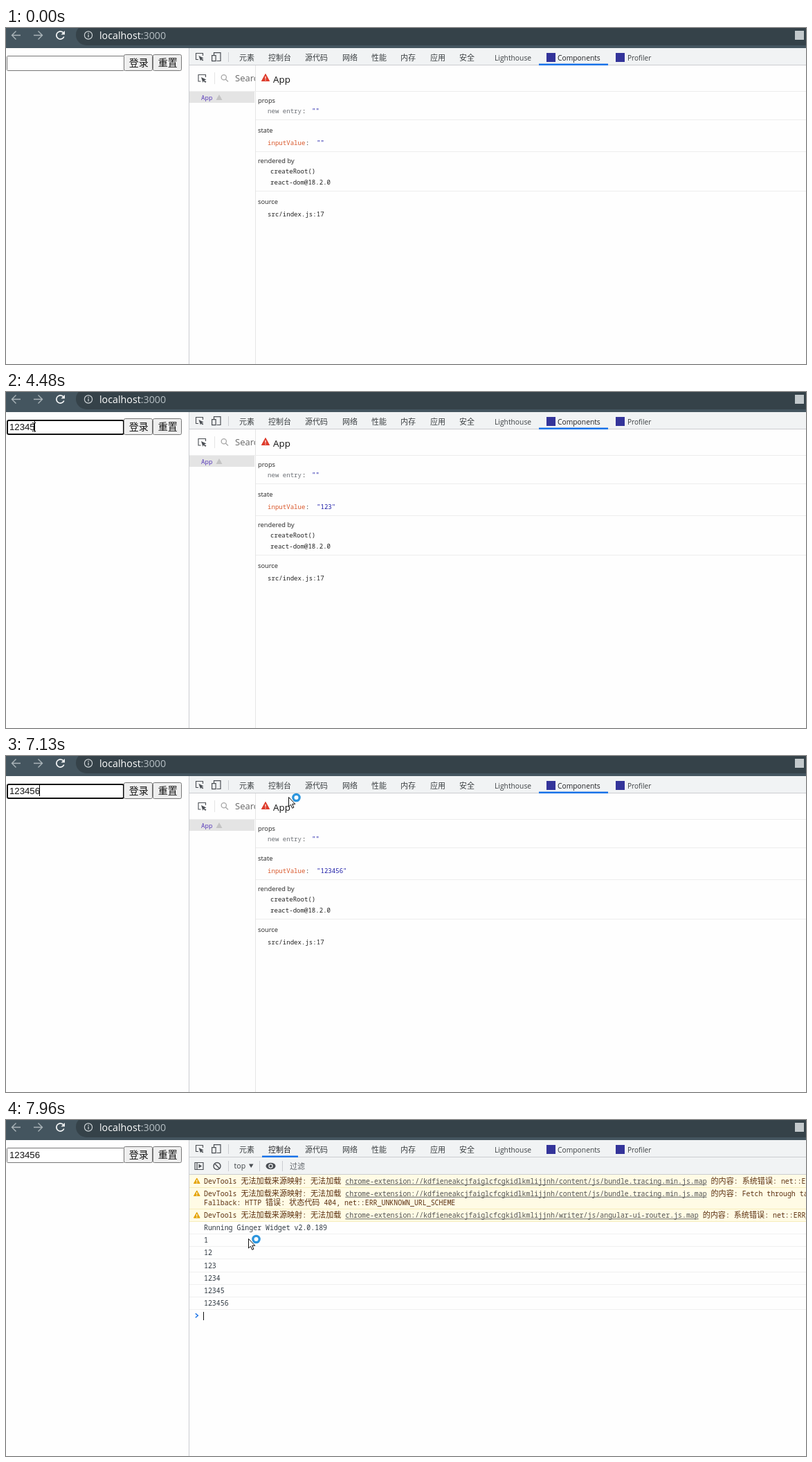
These frames come from a looping animation (1156x485 px, 8000 ms). An HTML page with a canvas:

```html
<!DOCTYPE html>
<html lang="zh-CN">
<head>
<meta charset="utf-8">
<title>localhost:3000</title>
<style>
html, body { margin: 0; width: 100%; height: 100%; overflow: hidden; background: #fefefe; }
canvas { display: block; }
</style>
</head>
<body>
<canvas id="stage" width="1156" height="485"></canvas>
<script>
const W = 1156, H = 485, LOOP = 8000;
const ctx = document.getElementById('stage').getContext('2d');
const CJK = '"Noto Sans CJK SC", "Noto Sans CJK", "Noto Sans CJK JP", sans-serif';
const UI = '"Open Sans", "Noto Sans", sans-serif';
const MONO = '"Noto Sans Mono", "DejaVu Sans Mono", monospace';
const ARIAL = '"Liberation Sans", Arial, sans-serif';
const BLUE = '#1a73e8', ICON = '#4a4e53', BAR = '#f1f3f4', RULE = '#cbcdd1', INK = '#222';

const KEYS = [1610, 2610, 3350, 4080, 4480, 4950];       // a digit enters the field
const POLLS = [[1680, 1], [2680, 2], [3680, 3], [4680, 5], [5680, 6]]; // inspector refresh
const CARETS = [880, 1680, ...KEYS.slice(1)];            // blink restarts
const FOCUS = 880, BLUR = 7400, SWITCH = 7540, BLINK = 530;

// Pointer path: time, x, y
const PATH = [
  [70, 907, 456], [200, 760, 360], [400, 330, 150], [550, 120, 75], [700, 48, 52], [750, 40, 50],
  [5409, 40, 50], [5410, 31, 50], [5479, 31, 50], [5480, 23, 50], [5680, 23, 50],
  [5890, 170, 95], [6170, 520, 215], [6240, 575, 226], [6310, 587, 227], [6450, 541, 209],
  [6646, 463, 210], [6870, 440, 165], [7100, 410, 65], [7267, 398, 31],
  [7500, 398, 31], [7540, 395, 27], [7680, 380, 80], [7958, 350, 171]
];

function box(x, y, w, h, color) {
  ctx.fillStyle = color;
  ctx.fillRect(x, y, w, h);
}

function text(s, x, y, size, family, color) {
  ctx.font = size + 'px ' + family;
  ctx.fillStyle = color;
  ctx.fillText(s, x, y);
  return x + ctx.measureText(s).width;
}

const mono = (s, x, y, color = INK) => text(s, x, y, 9.07, MONO, color);
const label = (s, x, y, color = INK) => text(s, x, y, 9.3, UI, color);
const cjk = (s, x, y, color = '#3c4043') => text(s, x, y, 11, CJK, color);

// Console line: Latin in mono, Chinese in the CJK face
function line(s, x, y, color = '#303942') {
  for (const run of s.match(/[\u4e00-\u9fff]+|[^\u4e00-\u9fff]+/g)) {
    const han = run > '\u4e00';
    x = text(run, x, y, han ? 11.1 : 9.905, han ? CJK : MONO, color);
  }
  return x;
}

function stroke(color, width, draw) {
  ctx.strokeStyle = color;
  ctx.lineWidth = width;
  ctx.beginPath();
  draw();
  ctx.stroke();
}

function poly(pts, close) {
  pts.forEach(([x, y], i) => i ? ctx.lineTo(x, y) : ctx.moveTo(x, y));
  if (close) ctx.closePath();
}

function fillPoly(pts, color) {
  ctx.fillStyle = color;
  ctx.beginPath();
  poly(pts, true);
  ctx.fill();
}

function dot(x, y, r, color) {
  ctx.fillStyle = color;
  ctx.beginPath();
  ctx.arc(x, y, r, 0, 7);
  ctx.fill();
}

function round(x, y, w, h, r, fill, edge, width) {
  ctx.beginPath();
  ctx.roundRect(x, y, w, h, r);
  if (fill) { ctx.fillStyle = fill; ctx.fill(); }
  if (edge) { ctx.strokeStyle = edge; ctx.lineWidth = width; ctx.stroke(); }
}

function warning(x, y, w, h, color) {
  fillPoly([[x, y + h], [x + w / 2, y], [x + w, y + h]], color);
  ctx.lineJoin = 'round';
  stroke(color, 1, () => poly([[x + .5, y + h - .5], [x + w / 2, y + .5], [x + w - .5, y + h - .5]], true));
  ctx.lineJoin = 'miter';
  box(x + w / 2 - .6, y + h * .34, 1.2, h * .34, '#fff');
  box(x + w / 2 - .6, y + h * .78, 1.2, 1.2, '#fff');
}

function inspectIcon(x, y, s) {
  stroke(ICON, 1.1, () => poly([[x + s, y + 4], [x + s, y + .5], [x + .5, y + .5], [x + .5, y + s - 1], [x + 4, y + s - 1]]));
  fillPoly([[x + 4.5, y + 4], [x + s + 1, y + 7.6], [x + 8.8, y + 8.6], [x + s + 1, y + s - .5],
            [x + s - .5, y + s + 1], [x + 8, y + 9.6], [x + 7, y + s + 1]], ICON);
}

function browserBar() {
  box(0, 0, W, 29, '#44555f');
  round(101, -5, 1100, 30, 15, '#354249');
  for (const [x, d] of [[8, 1], [53, -1]]) {
    stroke('#aab4b9', 1.4, () => {
      poly([[x + 13 * d, 10.5], [x + d, 10.5]]);
      poly([[x + 6.5 * d, 4.5], [x + .5 * d, 10.5], [x + 6.5 * d, 16.5]]);
    });
  }
  stroke('#f3f5f6', 1.7, () => ctx.arc(78.5, 10.5, 5.6, .35, 5.5));
  fillPoly([[85, 4], [85, 9.5], [79.5, 9.5]], '#f3f5f6');
  stroke('#cdd3d6', 1.2, () => ctx.arc(119, 10.5, 5.6, 0, 7));
  box(118.4, 9.5, 1.3, 4, '#cdd3d6');
  box(118.4, 7, 1.3, 1.4, '#cdd3d6');
  const x = text('localhost', 135, 16, 14.25, UI, '#fff');
  text(':3000', x, 16, 14.25, UI, '#b6bfc4');
  box(1140, 4, 13, 13, '#c3c9cc');
}

function page(t, p) {
  box(0, 29, 264, H - 29, '#fefefe');
  const focused = t >= FOCUS && t < BLUR;
  if (focused) round(2, 41, 168, 20, 2, '#fff', '#101010', 2);
  else round(1.5, 40.5, 169, 21, 1, '#fff', p && inField(p) ? '#4f4f4f' : '#767676', 1);
  const n = KEYS.filter(k => t >= k).length;
  text('123456'.slice(0, n), 5, 54.5, 13.2, ARIAL, '#111');
  if (focused) {
    const last = CARETS.filter(k => t >= k).pop();
    if (Math.floor((t - last) / BLINK) % 2 === 0 && !(t >= 1610 && t < 1680))
      box(Math.floor(5 + 7.24 * n), 42, 1, 16, '#000');
  }
  [['登录', 170.5], ['重置', 212.5]].forEach(([s, x]) => {
    round(x, 38.5, 41, 23, 2, '#efefef', '#767676', 1);
    text(s, x + 7.2, 55, 14, CJK, '#111');
  });
}

function tabs(onConsole, p) {
  box(264, 29, W - 264, 25, BAR);
  box(264, 53, W - 264, 1, RULE);
  if (!onConsole && p && p.y >= 30 && p.y < 53 && p.x >= 370 && p.x < 422) box(370, 30, 52, 23, '#dfe1e5');
  inspectIcon(274, 36, 10.5);
  stroke(ICON, 1.2, () => {
    poly([[300.5, 39], [300.5, 35.6], [310, 35.6], [310, 47.5], [304.5, 47.5]]);
    ctx.rect(297.6, 39.6, 5.5, 8);
  });
  box(321, 35, 1, 14, RULE);
  const names = [['元素', 337], ['控制台', 379], ['源代码', 432], ['网络', 486], ['性能', 528],
                 ['内存', 570], ['应用', 613], ['安全', 655]];
  names.forEach(([s, x]) => cjk(s, x, 46.5, onConsole && x === 379 ? '#202124' : '#3c4043'));
  text('Lighthouse', 706, 46.5, 10.3, UI, '#3c4043');
  text('Components', 797, 46.5, 10.3, UI, onConsole ? '#3c4043' : '#202124');
  text('Profiler', 898, 46.5, 10.1, UI, '#3c4043');
  box(781, 36, 13, 13, '#34349a');
  box(881, 36, 13, 13, '#34349a');
  if (onConsole) box(370, 51.5, 52, 2.5, BLUE);
  else box(770, 51.5, 100, 2.5, BLUE);
}

function components(t) {
  inspectIcon(277.5, 67, 11);
  box(301, 64, 1, 17, '#e4e4e4');
  stroke('#a8a8a8', 1.3, () => {
    ctx.arc(314.8, 71.3, 3.6, 0, 7);
    poly([[317.4, 74], [321, 77.5]]);
  });
  ctx.save();
  ctx.beginPath();
  ctx.rect(265, 54, 95, 40);
  ctx.clip();
  text('Search', 331, 77, 13, UI, '#666');
  ctx.restore();
  box(265, 92, 94, 16, '#e4e4e4');
  mono('App', 282, 103.5, '#5a3dbb');
  fillPoly([[303.5, 104], [308, 96], [312.5, 104]], '#c4c4c4');
  box(360, 54, 1, H - 54, '#e6e6e6');
  for (const y of [91, 132, 178, 235]) box(y === 91 ? 265 : 361, y, W, 1, '#ededed');

  warning(369, 66, 12, 11, '#de3c2c');
  text('App', 386, 78.5, 13.4, UI, '#111');
  label('props', 364, 108);
  mono('new entry', 378, 123, '#6c7076');
  mono(':', 428, 123);
  mono('""', 442, 123, '#1a1aa6');
  label('state', 364, 151);
  mono('inputValue', 378, 169, '#d9572a');
  mono(':', 433, 169);
  const poll = POLLS.filter(q => t >= q[0]).pop();
  mono('"' + '123456'.slice(0, poll ? poll[1] : 0) + '"', 449, 169, '#1a1aa6');
  label('rendered by', 364, 194.5);
  mono('createRoot()', 382, 209.5);
  mono('react-dom@18.2.0', 382, 225.5);
  label('source', 364, 254);
  mono('src/index.js:17', 378, 271.5);
}

function consoleBar() {
  box(265, 54, W, 24, BAR);
  box(265, 78, W, 1, RULE);
  stroke(ICON, 1.2, () => {
    ctx.rect(273, 61.5, 12, 10);
    poly([[276, 61.5], [276, 71.5]]);
  });
  fillPoly([[278.5, 63.5], [283, 66.5], [278.5, 69.5]], ICON);
  stroke(ICON, 1.4, () => {
    ctx.arc(305, 66.5, 5, 0, 7);
    poly([[301.5, 63], [308.5, 70]]);
  });
  for (const x of [321, 366, 399]) box(x, 59, 1, 15, RULE);
  text('top', 329.5, 70, 10.6, UI, '#3c4043');
  fillPoly([[351, 63.5], [357.5, 63.5], [354.2, 69]], ICON);
  ctx.fillStyle = ICON;
  ctx.beginPath();
  ctx.ellipse(382.5, 66.5, 7, 4.8, 0, 0, 7);
  ctx.fill();
  dot(382.5, 66.5, 3.2, BAR);
  dot(382.5, 66.5, 1.9, ICON);
  cjk('过滤', 410, 70.5, '#5f6368');
}

function consoleLog() {
  const brown = '#5c3010', base = 'chrome-extension://kdfieneakcjfaiglcfcgkidlkmlijjnh/';
  box(265, 79, W, 68, '#fffbe5');
  for (const y of [97, 128, 146]) box(265, y, W, 1, '#f7edba');
  const rows = [
    [91.5, 'content/js/bundle.tracing.min.js.map', '系统错误: net::ERR_UNKNOWN_URL_SCHEME'],
    [109.5, 'content/js/bundle.tracing.min.js.map', 'Fetch through target failed'],
    [141, 'writer/js/angular-ui-router.js.map', '系统错误: net::ERR_UNKNOWN_URL_SCHEME']
  ];
  for (const [y, file, why] of rows) {
    warning(271, y - 8, 9.5, 8.5, '#e5a50a');
    const x = line('DevTools 无法加载来源映射: 无法加载 ', 286, y, brown);
    const end = line(base + file, x, y, '#545454');
    box(x, y + 1.3, end - x, 1, '#6a6a6a');
    line(' 的内容: ' + why, end, y, brown);
  }
  line('Fallback: HTTP 错误: 状态代码 404, net::ERR_UNKNOWN_URL_SCHEME', 286, 122.5, brown);
  line('Running Ginger Widget v2.0.189', 286, 159);
  box(265, 164, W, 1, '#f0f0f0');
  for (let i = 1; i <= 6; i++) {
    line('123456'.slice(0, i), 286, 159 + 18.2 * i);
    box(265, Math.round(164 + 18.2 * i), W, 1, '#f0f0f0');
  }
  stroke(BLUE, 1.5, () => poly([[273.8, 279.3], [277.3, 282.3], [273.8, 285.3]]));
  box(285, 277, 1, 12, '#111');
}

const inField = p => p.x < 170 && p.y > 40 && p.y < 62;

function pointerAt(t) {
  if (t < 70) return null;
  let q = t;
  if (t < 750) q = 70 + Math.floor((t - 70) / 68) * 68;
  else if (t >= 5680) q = 5680 + Math.floor((t - 5680) / 69.05) * 69.05;
  const i = PATH.findIndex(k => k[0] > q);
  if (i < 0) return { x: 350, y: 171 };
  const [t0, x0, y0] = PATH[i - 1], [t1, x1, y1] = PATH[i];
  const f = (q - t0) / (t1 - t0);
  return { x: Math.round(x0 + (x1 - x0) * f), y: Math.round(y0 + (y1 - y0) * f) };
}

function pointer(p, t) {
  const { x, y } = p;
  if (inField(p)) {
    stroke('#111', 1, () => {
      poly([[x + .5, y - 5], [x + .5, y + 6]]);
      for (const e of [y - 5.5, y + 6.5]) {
        poly([[x - 2, e], [x, e]]);
        poly([[x + 1, e], [x + 3, e]]);
      }
    });
    return;
  }
  const tip = [[0, 0], [0, 13.5], [3, 10.7], [5.2, 15.8], [7.4, 14.8], [5.2, 9.8], [9.3, 9.8]]
    .map(([a, b]) => [x + a + .5, y + b + .5]);
  fillPoly(tip, '#fff');
  stroke('#111', 1, () => poly(tip, true));
  if (x > 264 && (y > 54 || t >= SWITCH)) {
    dot(x + 11.5, y + 1, 6.3, '#2b95dd');
    dot(x + 11.5, y + 1, 3, '#fff');
  }
}

function draw(t) {
  const p = pointerAt(t), onConsole = t >= SWITCH;
  box(0, 0, W, H, '#fefefe');
  browserBar();
  page(t, p);
  tabs(onConsole, p);
  if (onConsole) {
    consoleBar();
    consoleLog();
  } else components(t);
  box(264, 29, 1, H - 29, RULE);
  if (p) pointer(p, t);
}

function tick() {
  draw(performance.now() % LOOP);
  requestAnimationFrame(tick);
}
tick();
</script>
</body>
</html>
```
